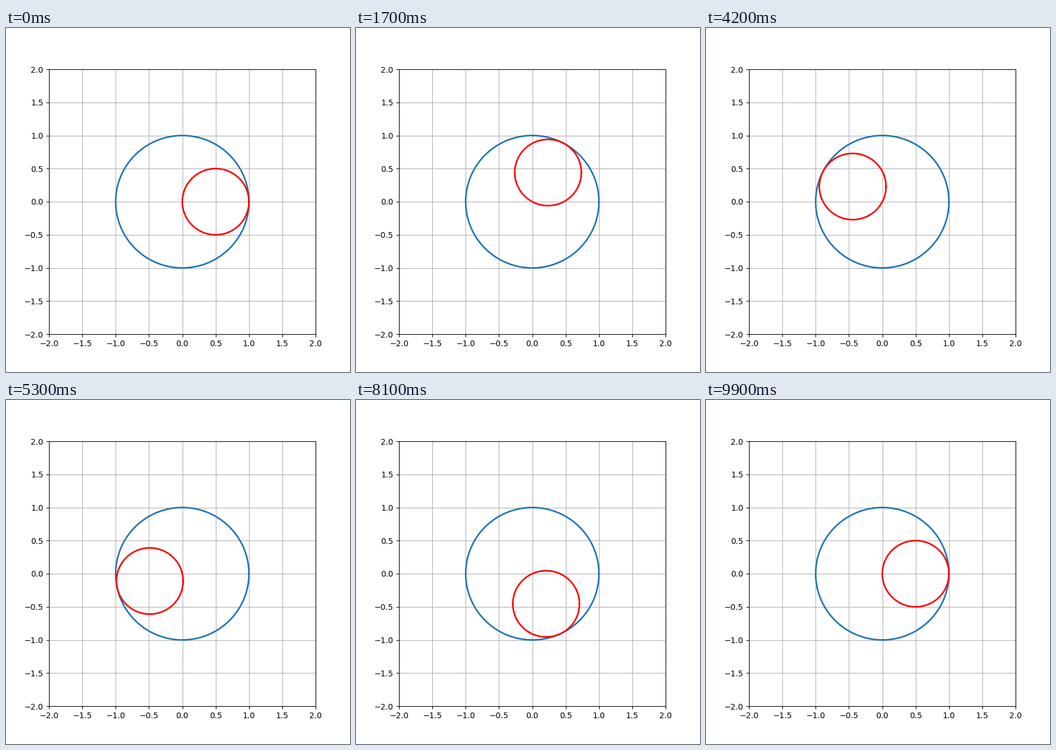
Write a matplotlib script that moves like this. It is 600 px wide and 600 px high and loops after 10000 ms.

```python
import numpy as np
import matplotlib.pyplot as plt
from matplotlib.animation import FuncAnimation

FRAMES = 100
INTERVAL = 100  # ms
R_OUTER, R_INNER = 1.0, 0.5

theta = np.linspace(0, 2 * np.pi, FRAMES)


def circle(radius, cx=0.0, cy=0.0):
    return cx + radius * np.cos(theta), cy + radius * np.sin(theta)


fig, ax = plt.subplots(figsize=(6, 6), dpi=100)
ax.set_xlim(-2, 2)
ax.set_ylim(-2, 2)
ax.grid(True)

ax.plot(*circle(R_OUTER), lw=2)
inner, = ax.plot([], [], color="red", lw=2)


def update(i):
    """Roll the small circle along the inside of the large one."""
    reach = R_OUTER - R_INNER
    inner.set_data(*circle(R_INNER, reach * np.cos(theta[i]), reach * np.sin(theta[i])))
    return inner,


anim = FuncAnimation(fig, update, frames=FRAMES, interval=INTERVAL,
                     repeat=True, repeat_delay=0)
plt.show()
```
